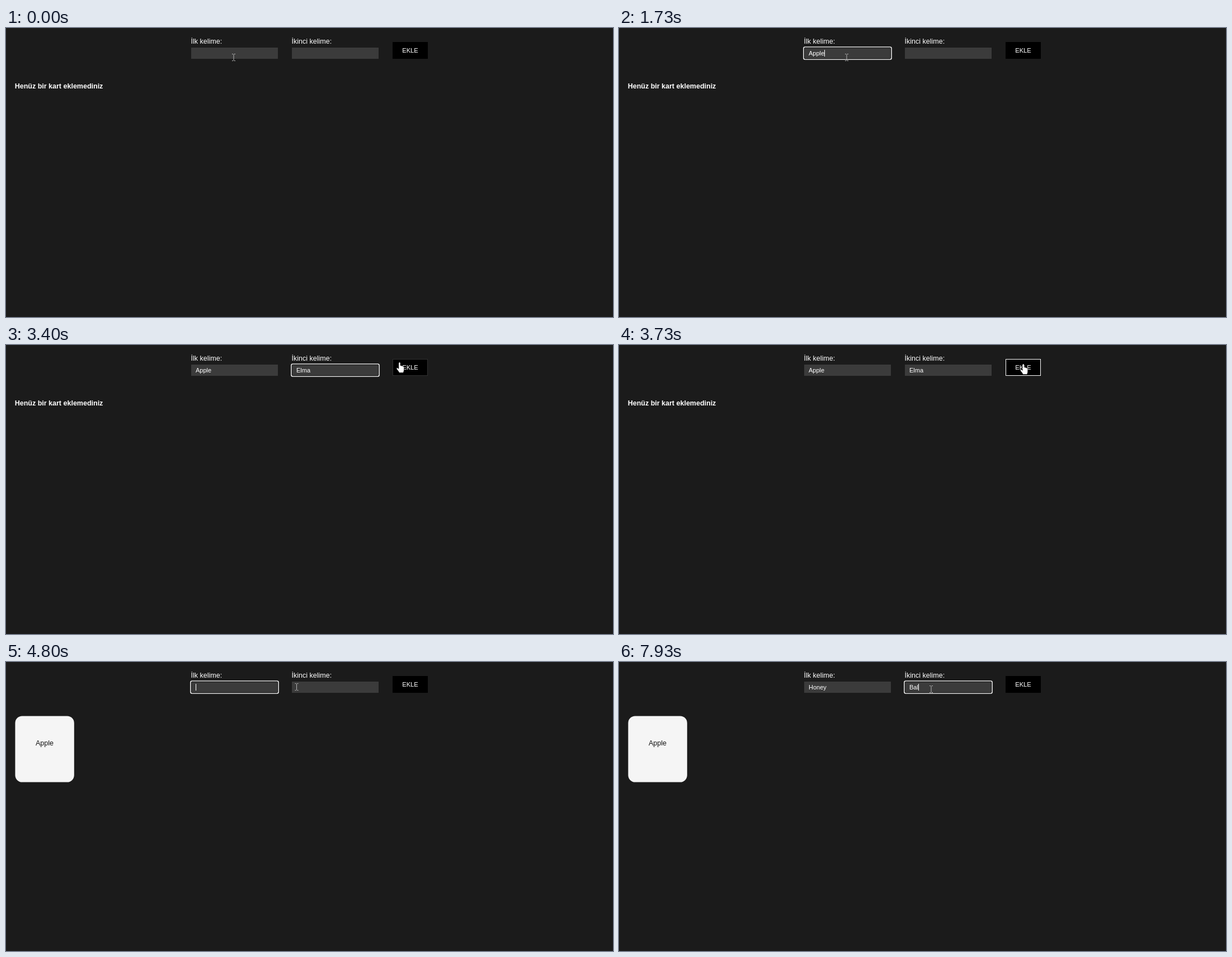
Animation, 1085 px wide and 516 px high, one loop 8 s. Source, as an HTML page:

```html
<!DOCTYPE html>
<html lang="tr">
<head>
<meta charset="utf-8">
<title>Kelime kartları</title>
<style>
  html, body { margin: 0; width: 100%; height: 100%; overflow: hidden; background: #1b1b1b; }
  svg { display: block; width: 100%; height: 100%; }
  text { font: 12.5px "Liberation Sans", Arial, sans-serif; fill: #fff; white-space: pre; }
  .value { font-size: 11px; }
  .button { font-size: 11.2px; text-anchor: middle; }
  .title { font-weight: bold; }
  .word { fill: #111; text-anchor: middle; }
  .field { fill: #3b3b3b; }
</style>
</head>
<body>
<svg viewBox="0 0 1085 516">
  <text x="330.6" y="28">İlk kelime:</text>
  <text x="510.6" y="28">İkinci kelime:</text>
  <rect class="field" x="331" y="35" width="155" height="20"/>
  <rect class="field" x="511" y="35" width="155" height="20"/>
  <g id="ring" fill="none">
    <rect x="331.5" y="35.5" width="154" height="19" rx="1" stroke="#1b1b1b"/>
    <rect x="329.9" y="33.9" width="157.2" height="22.2" rx="2.5" stroke="#fff" stroke-width="1.4"/>
  </g>
  <text class="value" id="first" x="339" y="49"/>
  <text class="value" id="second" x="519" y="49"/>
  <rect id="caret" y="39" width="1" height="12" fill="#fff" shape-rendering="crispEdges"/>

  <rect x="691" y="25" width="63" height="30"/>
  <rect id="border" x="691.5" y="25.5" width="62" height="29" fill="none" stroke="#fff"/>
  <text class="button" x="722.5" y="44">EKLE</text>

  <text class="title" id="empty" x="15.7" y="108">Henüz bir kart eklemediniz</text>
  <g id="card">
    <rect x="16.4" y="96.4" width="105.4" height="118.2" rx="12.5" fill="#f5f5f5"/>
    <text class="word" x="69" y="149">Apple</text>
  </g>

  <g id="beam" fill="none" stroke="#b4b4b4">
    <path d="M-3 -6H-.8M.8 -6H3M-3 6H-.8M.8 6H3M0 -5.5V5.5"/>
  </g>
  <path id="arrow" d="M0 0V14L3.2 11L5.6 16.4L7.8 15.4L5.5 10.2H10Z" fill="#fff" stroke="#111" stroke-width=".8"/>
  <path id="hand" fill="#fff" stroke="#111" stroke-width=".7"
    d="M-1.6 1.4Q-1.4 -.3 0 -.3Q1.4 -.3 1.5 1.4V6Q3.2 4.9 4 6.5Q5.6 5.7 6.2 7.3Q8 6.8 8 8.8V13Q8 15.5 6.6 18.4H-.6Q-2 15.5 -4.8 12.4Q-6.2 10.6 -4.8 9.8Q-3.4 9.2 -1.6 11.4Z"/>
</svg>
<script>
const $ = id => document.getElementById(id);
const LOOP = 8000, TICK = 1000 / 15, BLINK = 510;

// time, focused field (-1: none), first word, second word, caret offset
const steps = [
  [0, -1, '', '', 0],
  [460, 0, '', '', 0],
  [1190, 0, 'A', '', 7],
  [1390, 0, 'Ap', '', 13],
  [1520, 0, 'App', '', 19],
  [1590, 0, 'Appl', '', 22],
  [1720, 0, 'Apple', '', 28],
  [1990, 1, 'Apple', '', 0],
  [2260, 1, 'Apple', 'E', 7],
  [2460, 1, 'Apple', 'El', 9],
  [2525, 1, 'Apple', 'Elm', 18],
  [2660, 1, 'Apple', 'Elma', 25],
  [3660, -1, 'Apple', 'Elma', 0],
  [3775, 0, '', '', 0],
  [5860, 0, 'H', '', 7],
  [6060, 0, 'Ho', '', 14],
  [6130, 0, 'Hon', '', 20],
  [6260, 0, 'Hone', '', 26],
  [6325, 0, 'Honey', '', 31],
  [6660, 1, 'Honey', '', 0],
  [7190, 1, 'Honey', 'B', 7],
  [7325, 1, 'Honey', 'Ba', 13],
  [7460, 1, 'Honey', 'Bal', 16]
];

// pointer path: time, x, y
const path = [
  [0, 407, 52.5], [3000, 407, 52.5], [3130, 470, 74], [3230, 570, 82], [3330, 672, 66],
  [3400, 703.5, 31], [3530, 720, 33], [3600, 720, 33], [3667, 722, 34], [3800, 723.5, 34],
  [3867, 690, 39], [3933, 590, 45], [4000, 519.5, 44.5], [7870, 519.5, 44.5],
  [7930, 558, 48.5], [LOOP, 558, 48.5]
];

const clamp = v => Math.min(1, Math.max(0, v));
const smooth = v => (v = clamp(v)) * v * (3 - 2 * v);
const show = (id, on) => $(id).setAttribute('visibility', on ? 'visible' : 'hidden');
const move = (id, x, y) => $(id).setAttribute('transform', `translate(${x} ${y})`);

function pointerAt(t) {
  const i = path.findIndex(p => p[0] > t);
  const [t0, x0, y0] = path[i - 1], [t1, x1, y1] = path[i];
  const k = (t - t0) / (t1 - t0);
  return [x0 + (x1 - x0) * k, y0 + (y1 - y0) * k];
}

function cursorKind(x, y) {
  const within = (left, right, top) => x >= left && x <= right && y >= top && y <= 55;
  if (within(691, 754, 25)) return 'hand';
  return within(331, 486, 35) || within(511, 666, 35) ? 'beam' : 'arrow';
}

function draw(t) {
  const [start, field, first, second, offset] = steps.findLast(s => s[0] <= t);
  $('first').textContent = first;
  $('second').textContent = second;
  show('ring', field >= 0);
  move('ring', Math.max(field, 0) * 180, 0);
  show('caret', field >= 0 && Math.floor((t - start) / BLINK) % 2 === 0);
  $('caret').setAttribute('x', 339 + field * 180 + offset);

  const added = t >= 3775;
  show('card', added);
  show('empty', !added);
  $('border').setAttribute('opacity', smooth((t - 3350) / 180) - smooth((t - 3830) / 160));

  const [x, y] = pointerAt(t), kind = cursorKind(x, y);
  for (const id of ['beam', 'arrow', 'hand']) show(id, id === kind);
  move(kind, x, y);
}

// the screen refreshes 15 times a second
function frame(now) {
  const t = now % LOOP;
  draw(Math.min(LOOP - 1, Math.floor((t + 4) / TICK) * TICK));
  requestAnimationFrame(frame);
}
draw(0);
requestAnimationFrame(frame);
</script>
</body>
</html>
```
